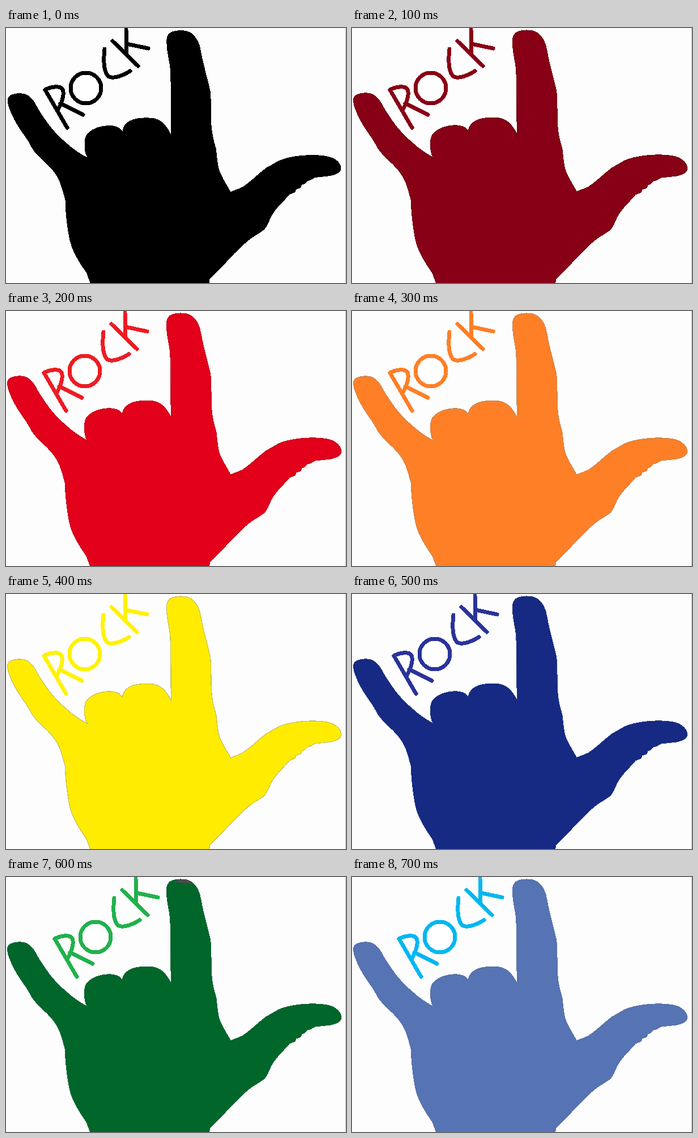
Write an HTML page that moves like this. It is 600 by 450 pixels and loops after 800 ms.

```html
<!DOCTYPE html>
<html lang="en">
<head>
<meta charset="utf-8">
<title>Rock</title>
<style>
  html, body { margin: 0; width: 100%; height: 100%; overflow: hidden; background: #fefdfe; }
  svg { display: block; width: 600px; height: 450px; shape-rendering: crispEdges; }
  #word { fill: none; stroke-width: 7; stroke-linecap: round; stroke-linejoin: round; }
  #word .hole { fill: #fff; }
</style>
</head>
<body>
<svg viewBox="0 0 600 450" role="img" aria-label="ROCK">
  <path d="M599.5 0V450" stroke="#b4b8b6"/>
  <path id="hand" stroke-width="1.3" d="M149 451L142 432C127 411 117 394 112.5 375C107.5 350 105 330 104.5 304
    C101 290 98 281 94.5 271C88 257 82 250 74 242C61 229 52 223 44 209C41 202 38 198 34 192
    C23 177 15.5 165 9.5 151C6 143 2.5 134 2.5 127C2.5 119 12 115 25 115C37 115 45 122 51 132
    C57 144 65 156 76 171C85 183 96 194 108 204C118 213 130 222 143.5 228.5
    C139 221 138.5 214 138.5 207C138.5 197 139.5 190 145 185C153 177 168 172 182 172C193 172 201 175 205.5 182
    C206 174 212 167 218 164C228 159 240 158 252 158.5C272 158.5 282 169 291.5 188.5
    L291 155C291 130 291 110 290 75C289 60 284 45 283.5 28C282.5 18 284 10 293 6.5C301 3.7 310 3.7 318 5
    C329 7 337 17 341.5 30C345 43 346 55 349.5 66C353 82 357 95 360.5 111C362.5 130 361.5 150 362.5 172
    C363.5 185 366.5 200 370.5 212C372.5 224 372.5 236 375.5 248C378.5 259 385 269 389.5 277L396.5 289
    C403 286 411 284 418 280C432 271 443 259 460 246C470 241.5 475 237 484 233
    C500 227 518 224.5 538 224C555 224 573 226 580 231C588 236 591.5 242 591.5 248
    C591 255 583 259 572 261L545 264C541 267 537 269 532 270L527 275L522 277L520 282L512 285L510 290L500 294
    L493 302C485 310 475 320 468.5 332C463.5 341 462.5 349 455.5 356C445.5 364 435.5 368 426.5 376
    C409.5 390 396.5 405 382.5 420C373.5 430 365.5 436 359.5 443L358.5 451Z"/>
  <path id="tip" fill="#4d4a4c" d="M297 9C302 4 312 4 318 4.5C323 6 326 8 328 12C319 10 307 11 297 9Z"/>
  <g id="word">
    <path class="hole" d="M69 109C80 103 95 102 99 107C104 114 100 130 91 145"/>
    <path d="M69 109L108 176M96 133L136 153"/>
    <circle class="hole" cx="141" cy="106" r="27"/>
    <path d="M174 37C172 55 172 72 178 82C183 92 203 86 219 76"/>
    <path d="M188 23L233 67M212 3L213 45M213 28L251 36"/>
  </g>
</svg>
<script>
  const STEP = 100;
  // hand, edge, word, word shift in x
  const looks = [
    ['#000000', 'none', '#000000', 0],
    ['#880015', '#6b0812', '#880015', -2],
    ['#e2001a', '#c00c1e', '#ed1c24', -2],
    ['#ff7f27', '#c98a55', '#ff7f27', -2],
    ['#ffec00', '#c9c05a', '#fff200', -2],
    ['#162983', '#22377f', '#2a3399', 5],
    ['#00662a', '#14663a', '#22b14c', 17],
    ['#5673b3', '#5a74a8', '#00b7f0', 14]
  ];
  const [hand, tip, word] = ['hand', 'tip', 'word'].map(id => document.getElementById(id));
  let shown = -1;

  function show(i) {
    const [fill, edge, ink, dx] = looks[i];
    hand.setAttribute('fill', fill);
    hand.setAttribute('stroke', edge);
    word.setAttribute('stroke', ink);
    word.setAttribute('transform', `translate(${dx} 0)`);
    tip.setAttribute('visibility', i === 6 ? 'visible' : 'hidden');
    shown = i;
  }

  const start = performance.now();
  function tick() {
    const i = Math.floor((performance.now() - start) / STEP) % looks.length;
    if (i !== shown) show(i);
    requestAnimationFrame(tick);
  }
  show(0);
  requestAnimationFrame(tick);
</script>
</body>
</html>
```
